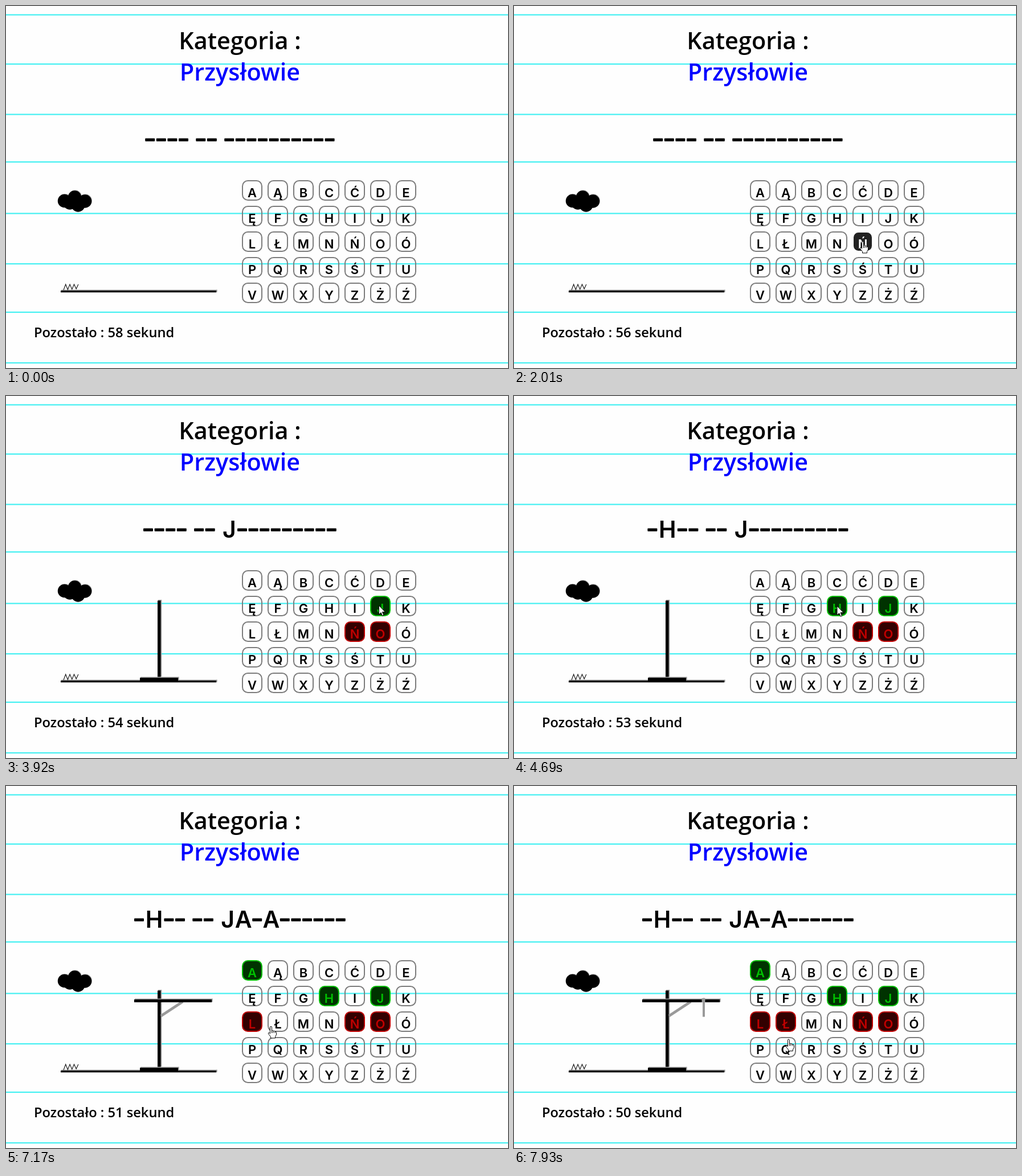
Animation, 881 px wide and 636 px high, one loop 8000 ms. Source, as an HTML page with a canvas:

```html
<!DOCTYPE html>
<html lang="pl">
<head>
<meta charset="utf-8">
<title>Wisielec</title>
<style>
  html, body { margin: 0; width: 100%; height: 100%; overflow: hidden; background: #fefefe; }
  canvas { display: block; }
</style>
</head>
<body>
<canvas id="stage" width="881" height="636"></canvas>
<script>
const ctx = document.getElementById('stage').getContext('2d');
const LOOP = 8000;
const TEXT = '"Open Sans", "Noto Sans", sans-serif';
const CAPS = 'Inter, Roboto, sans-serif';
const LETTERS = [...'AĄBCĆDEĘFGHIJKLŁMNŃOÓPQRSŚTUVWXYZŻŹ'];
const RULES = [15.5, 102, 190.5, 274, 364.5, 453, 538, 627];
const GRAY = '#9a9a9a';
const KEY = 36, PITCH = 45;

// What the phrase shows once everything guessed is in place
const PHRASE = '-H-- -- JA-A------';
const SLOT = { '-': 19.6, ' ': 10.7, H: 32.8, J: 26, A: 29 };

// The pointer glides to a key from start to end, then clicks it
const ENTRY = [811, 352];
const MOVES = [
  { key: 'Ń', start: 1190, end: 1810, click: 2080 },
  { key: 'O', start: 2150, end: 2630, click: 2960 },
  { key: 'J', start: 3100, end: 3650, click: 3780 },
  { key: 'H', start: 3850, end: 4550, click: 4620 },
  { key: 'A', start: 4760, end: 5390, click: 5460 },
  { key: 'L', start: 6080, end: 6530, click: 6650 },
  { key: 'Ł', start: 6900, end: 7310, click: 7520 },
  { key: 'X', start: 7650, end: 8420, click: Infinity }
];
const BOW = 12;
const HOVER_LAG = 100;

const ARROW = new Path2D('M0 0V16L3.7 12.6L6.1 18.4L8.5 17.4L6.1 11.6H11.2Z');
const HAND = new Path2D('M-1.5 12V1Q-1.5-.5 0-.5T1.5 1V7Q3 5.5 4 7.5Q6 6.5 7 8.5Q9.5 8 9.5 10.5V14L7.5 17.5V20H-.5V17.5L-4.5 12.5Q-5 10-3.5 10.5Z');
const KNUCKLES = new Path2D('M1.5 7V11M4 7.5V11M7 8.5V11');

const isHit = c => PHRASE.includes(c);
const clicked = (c, t) => MOVES.some(m => m.key === c && t >= m.click);
const keyX = i => 414 + PITCH * (i % 7);
const keyY = i => 306 + PITCH * Math.floor(i / 7);

function keyCentre(c) {
  const i = LETTERS.indexOf(c);
  return [keyX(i) + KEY / 2, keyY(i) + KEY / 2];
}

// Eased glide along a slightly bowed line
function pointer(t) {
  const n = MOVES.findLastIndex(m => t >= m.start);
  if (n < 0) return null;
  const { key, start, end } = MOVES[n];
  const [x0, y0] = n ? keyCentre(MOVES[n - 1].key) : ENTRY;
  const [x1, y1] = keyCentre(key);
  const u = Math.min(1, (t - start) / (end - start));
  const s = u * u * (3 - 2 * u);
  const dx = x1 - x0, dy = y1 - y0;
  const bow = BOW * Math.sin(Math.PI * s) / Math.hypot(dx, dy);
  return [x0 + dx * s - dy * bow, y0 + dy * s + dx * bow];
}

function keyAt(p) {
  if (!p) return -1;
  return LETTERS.findIndex((c, i) => {
    const dx = p[0] - keyX(i), dy = p[1] - keyY(i);
    return dx >= 0 && dx < KEY && dy >= 0 && dy < KEY;
  });
}

function text(str, x, y, font, color = '#000', align = 'center') {
  ctx.font = font;
  ctx.fillStyle = color;
  ctx.textAlign = align;
  ctx.fillText(str, x, y);
}

function rect(color, x, y, w, h) {
  ctx.fillStyle = color;
  ctx.fillRect(x, y, w, h);
}

function line(color, width, points) {
  ctx.strokeStyle = color;
  ctx.lineWidth = width;
  ctx.beginPath();
  for (const [x, y] of points) ctx.lineTo(x, y);
  ctx.stroke();
}

// Black bar with a soft gray edge above and to the right
function bar(x, y, w, h) {
  rect(GRAY, x + 1, y - 1.5, w + 0.7, h + 1);
  rect('#000', x, y, w, h);
}

function drawCloud() {
  const puffs = [[102.5, 342.5], [120.5, 336], [138.5, 343], [126.5, 350], [112, 346]];
  for (const [color, shift] of [[GRAY, 0.8], ['#000', 0]]) {
    ctx.fillStyle = color;
    for (const [x, y] of puffs) {
      ctx.beginPath();
      ctx.arc(x + shift, y - shift, 11.7, 0, 7);
      ctx.fill();
    }
  }
}

function drawGround() {
  bar(96, 500, 273, 3.2);
  const grass = Array.from({ length: 8 }, (_, i) => [101 + i * 3.7, i % 2 ? 489 : 499 - i / 3]);
  line('#222', 1.2, grass);
}

function drawGallows(misses) {
  if (misses > 0) bar(235, 495, 67, 5.5);
  if (misses > 1) bar(266, 359.5, 5.5, 134);
  if (misses > 2) {
    line(GRAY, 4.5, [[272, 404], [310, 379]]);
    bar(225, 375, 136, 5);
  }
  if (misses > 3) {
    rect(GRAY, 331, 372.5, 4, 33);
    rect(GRAY, 329.5, 373, 6, 7);
  }
}

function drawPhrase(t) {
  const shown = [...PHRASE].map(c => c === ' ' || clicked(c, t) ? c : '-');
  let x = 411.7 - shown.reduce((sum, c) => sum + SLOT[c], 0) / 2;
  for (const c of shown) {
    if (c === '-') {
      ctx.fillStyle = '#000';
      ctx.beginPath();
      ctx.roundRect(x, 232.5, 17, 5.2, 1);
      ctx.fill();
    } else if (c !== ' ') {
      text(c, x + SLOT[c] / 2 - 1, 249, '600 41px ' + CAPS);
    }
    x += SLOT[c];
  }
}

function drawKey(c, i, t, hover) {
  const x = keyX(i), y = keyY(i);
  let ink = '#000', border = '#7c7c7c', fill = null;
  if (clicked(c, t)) {
    ink = border = isHit(c) ? '#00c000' : '#c00000';
    fill = isHit(c) ? '#003300' : '#330000';
  } else if (hover) {
    ink = border = '#fff';
    fill = '#222';
  }
  ctx.beginPath();
  ctx.roundRect(x + 1, y + 1, KEY - 2, KEY - 2, 9.5);
  if (fill) {
    ctx.fillStyle = fill;
    ctx.fill();
  }
  ctx.strokeStyle = border;
  ctx.lineWidth = 2;
  ctx.stroke();
  text(c, x + KEY / 2, y + 30, '600 22px ' + CAPS, ink);
}

function drawPointer(p, hand) {
  const shape = hand ? HAND : ARROW;
  ctx.save();
  ctx.translate(p[0], p[1]);
  ctx.fillStyle = '#fff';
  ctx.strokeStyle = '#000';
  ctx.lineWidth = 1;
  ctx.fill(shape);
  ctx.stroke(shape);
  if (hand) ctx.stroke(KNUCKLES);
  ctx.restore();
}

function draw(t) {
  rect('#fefefe', 0, 0, 881, 636);
  for (const y of RULES) rect('#45f0f2', 0, y - 1.1, 881, 2.2);

  text('Kategoria :', 410.5, 76, '600 41.4px ' + TEXT);
  text('Przysłowie', 410.5, 131, '600 41.4px ' + TEXT, '#0000ff');
  drawPhrase(t);

  drawCloud();
  drawGround();
  drawGallows(MOVES.filter(m => !isHit(m.key) && t >= m.click).length);

  const hovered = keyAt(pointer(t - HOVER_LAG));
  LETTERS.forEach((c, i) => drawKey(c, i, t, i === hovered));

  const left = 58 - Math.floor((t + 540) / 1000);
  text(`Pozostało : ${left} sekund`, 49, 582, '600 23.7px ' + TEXT, '#000', 'left');

  const p = pointer(t);
  if (p) {
    const over = keyAt(p);
    drawPointer(p, over >= 0 && !clicked(LETTERS[over], t));
  }
}

const start = performance.now();
function tick() {
  draw((performance.now() - start) % LOOP);
  requestAnimationFrame(tick);
}
tick();
</script>
</body>
</html>
```
